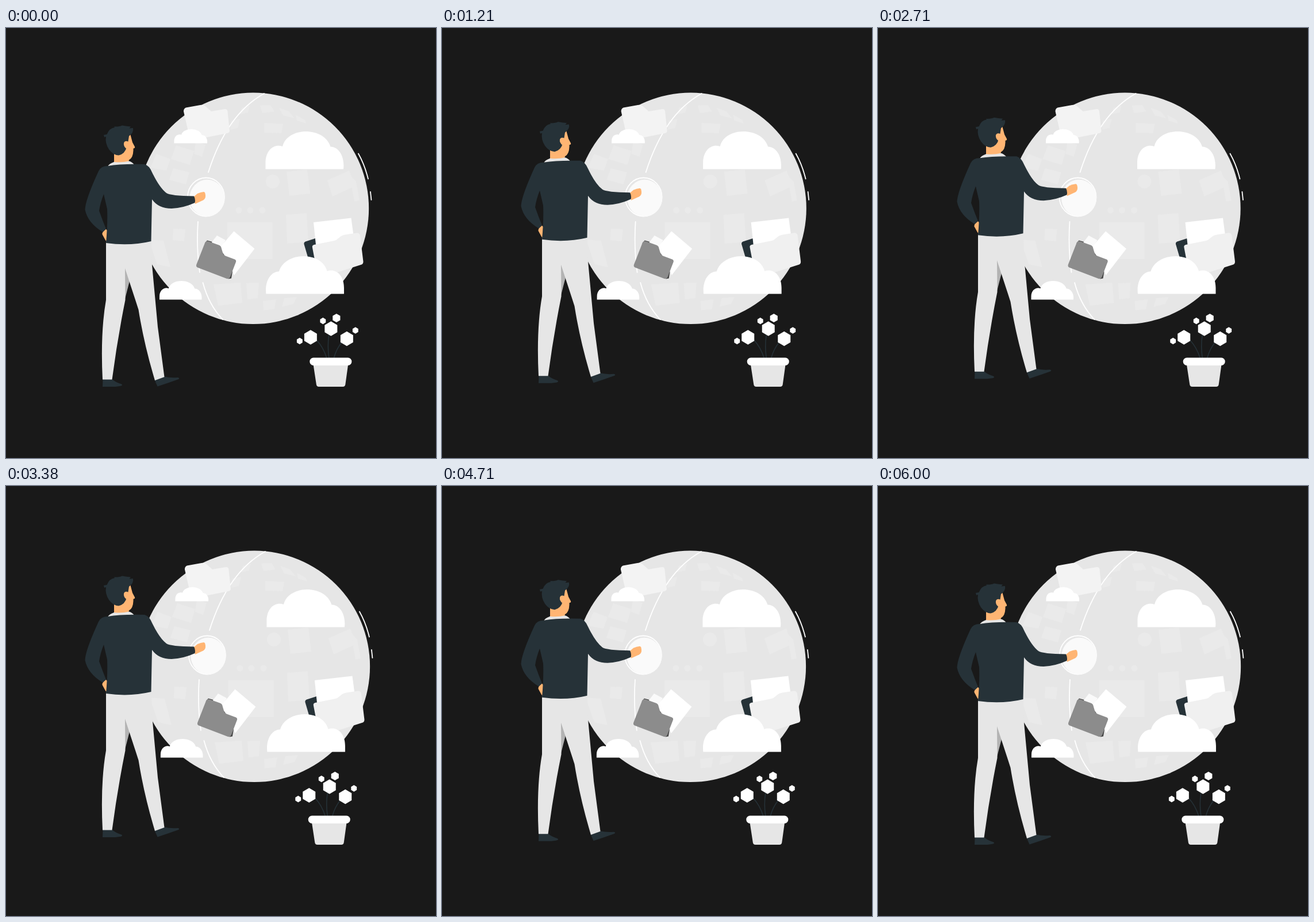
Animation of 748 by 748 pixels, one loop 6040 ms. Source, as an HTML page:

```html
<!DOCTYPE html>
<html lang="en">
<head>
<meta charset="utf-8">
<title>Globe of files</title>
<style>
html, body { margin: 0; width: 100%; height: 100%; overflow: hidden; background: #191919; }
svg { display: block; width: 100vw; height: 100vh; }
.white { fill: #fff; }
.pale { fill: #e6e6e6; }
.navy { fill: #263238; }
.skin { fill: #ffb573; }
.line { fill: none; stroke: #fff; stroke-width: 1.8; stroke-linecap: round; }
.stem { fill: none; stroke: #263238; stroke-width: 1.5; }
</style>
</head>
<body>
<svg viewBox="0 0 748 748">
  <defs>
    <path id="cloud" d="M0 65.5V55C0 31 16 21 29.500 26C38 -8.500 102 -9 113 26.500C129 27 138 46 135.500 65.500Z"/>
    <path id="hex" d="M0-1L.866-.5V.5L0 1L-.866 .5V-.5Z"/>
  </defs>

  <g id="globe">
    <circle class="pale" cx="430" cy="313.800" r="201.200"/>
    <g fill="#eaeaea">
      <circle cx="464" cy="267" r="12"/>
      <circle cx="405" cy="317" r="5.500"/><circle cx="425" cy="317" r="5.500"/><circle cx="446" cy="317" r="5.500"/>
      <path d="M488 250L524 246L529 288L493 292ZM559 265L597 248L607 275L568 293ZM385 338H464V402H385ZM487 325L523 322L526 372L489 375Z"/>
      <path d="M296 204L327 214L320 238L287 228ZM262 219L286 228L279 248L251 243ZM291 244L319 251L313 272L284 264ZM248 368L274 370L286 416L263 411Z"/>
      <path d="M361 446L408 443L411 478L369 483ZM418 444L440 443L438 470L420 472ZM291 349L312 350L310 371L290 369ZM449 165L482 167L479 183L449 182Z"/>
      <path d="M410 139L424 135L421 147L407 150ZM442 135L460 134L467 145L446 148ZM475 139L492 145L502 157L482 152ZM504 151L520 160L522 166L506 161ZM392 161L407 158L403 174L390 177ZM598 256L609 267L615 300L606 302ZM447 475L470 472L467 489L448 491ZM484 470L506 468L500 480L480 485ZM330 198L347 203L341 224L327 219Z"/>
    </g>
    <path class="line" d="M449 114Q384 150 352 251M334 337Q331 383 337 425M342.500 443Q353 482 377 507M613 218.500Q624 238 630 262.500M634 285L635.500 299"/>
    <ellipse class="line" cx="348" cy="294" rx="32" ry="33.500" stroke-width="1.500"/>
    <ellipse cx="350" cy="295.800" rx="30.500" ry="32" fill="#fafafa"/>

    <path fill="#f3f3f3" d="M309 145Q309 140 313 138.500L338 134Q344 133 348 137L357 145L381 141Q385 141 385.500 145L389 179Q389 182 385 183L330 194Q321 195 319 189Z"/>
    <use href="#cloud" class="white" transform="translate(292.500 176) scale(.425 .375)"/>

    <path fill="#454545" d="M346 374L350 369.500L359 372L396 412L392 435.500L387 436.500L350 390Z"/>
    <path fill="#fafafa" d="M357 374L367 361L382 369L374 384Z"/>
    <path class="white" d="M396.500 353.500L432.500 384L397 430L373 381Z"/>
    <path fill="#8c8c8c" d="M346 374Q348 370 352 371L370 377.500Q374 379 374.500 382L377 391Q378 395 382 396.500L398 402.500Q401 404 400 407L390 433Q388 437 384 436L333 416.500Q330 415 331.500 411Z"/>

    <path class="navy" d="M518.500 376Q518 372.500 521 371.500L538 366L548 404L527 405Z"/>
    <path class="white" d="M535 338L600.500 330.500L606 372L540 386Z"/>
    <path fill="#f0f0f0" d="M533 382Q532 378 536 377L571 370Q575 369 578 366L583 362Q586 360 590 359.500L610 356.500Q615 356 616 361L621.500 406Q622 411 617 412L573 426L541 424Z"/>
    <use href="#cloud" class="white" transform="translate(451.500 180)"/>
    <use href="#cloud" class="white" transform="translate(588 397) scale(-1 1)"/>
    <use href="#cloud" class="white" transform="translate(267 440) scale(.542 .496)"/>
  </g>

  <g id="plant">
    <path class="stem" d="M558 574Q552 555 540.500 543M562 574Q559 553 562 534M570.500 574Q575 558 584 547"/>
    <g id="blooms" class="white"></g>
    <path class="pale" d="M534.500 584H595.500L590.500 620Q590 624 586 624H544.500Q540.500 624 540 620Z"/>
    <rect class="white" x="528.500" y="573.500" width="73" height="13.500" rx="6.500"/>
  </g>

  <g id="man">
    <path class="navy" d="M168.500 611H184.500Q190 616 201 619.500Q204 622 198 623L190 624H168ZM258.500 612L275.500 606.500Q285 609 299 608Q303 609 300 611L283 617L263.500 623.500Z"/>
    <path fill="#b3b3b3" d="M206 416H215V440L206 475Z"/>
    <path class="pale" d="M174 371H253L254 412L264 520L275.500 607L259 613Q240 550 230.500 490L226 476L207 418L207.500 473Q194 540 184.500 611.500H168Q164 530 174 473Z"/>
    <path class="skin" d="M174 350Q167 354 167.500 359L173.500 370H176V352Z"/>
    <path class="skin" d="M326 294L333 288Q339 285.500 344 285Q346.500 285 347 291Q347.500 297 343 299.500L329 306Z"/>
    <path class="skin" d="M188 212V235Q200 240 213 233L214 229.500Q221 226 221.500 213V209.500Q225 209 224 206.500L220 199L216 184L200 190Z"/>
    <path class="pale" d="M177 241Q179 236 188 233Q201 234.500 214 231.500Q220 233 224 239Z"/>
    <path class="navy" d="M177 240Q200 236 241 237Q249 239 254 251Q267 278 279 287Q286 292 327 292.500Q330 298 328.500 304Q309 313 288 314Q265 314 254 298L252.500 371Q215 380 174 374Q177 340 176 315L170 289Q164 304 162 318Q168 335 174 349.500L168.500 355Q142 339 137.500 316Q138 299 161 249Q165 240 177 240Z"/>
    <path class="navy" d="M171 190L170 186L175.500 185Q180 174 189 173L188 171.500Q197 172 202 169.500Q210 171 217 171.500L214.500 174.500L221 174Q222.500 182 214 188Q213 197 210 207Q207 219 196 221.500Q186 221 179 211Q172 200 174 189Z"/>
    <path class="skin" d="M213 198Q207 195 205 200Q204 206 210 210.500L215 208Z"/>
  </g>
</svg>
<script>
const el = id => document.getElementById(id);

el('blooms').innerHTML = [
  [530, 538, 12.7], [565.5, 523, 12.7], [593, 540.5, 12.7],
  [575, 504.5, 7.6], [551.5, 509.5, 5.7], [608, 526, 5.7], [511, 544.5, 5.7]
].map(([x, y, r]) => `<use href="#hex" transform="translate(${x} ${y}) scale(${r})"/>`).join('');

// Sideways offsets at each tenth of a shake.
const SHAKE = [0, -1.5, 3, -6, 6, -6, 6, -6, 3, -1.5, 0];

function shake(t, period) {
  const p = t % period / period * 10;
  const i = Math.floor(p);
  return SHAKE[i] + (SHAKE[i + 1] - SHAKE[i]) * (p - i);
}

function move(id, x, y) {
  el(id).setAttribute('transform', `translate(${x} ${y})`);
}

const start = performance.now();

function draw() {
  const t = (performance.now() - start) % 6040 + 15;
  const rise = 1 - Math.abs(t % 6000 / 3000 - 1);
  move('globe', shake(t, 6000), 0);
  move('plant', shake(t, 1500), 0);
  move('man', 0, -15 * rise);
  requestAnimationFrame(draw);
}
draw();
</script>
</body>
</html>
```
